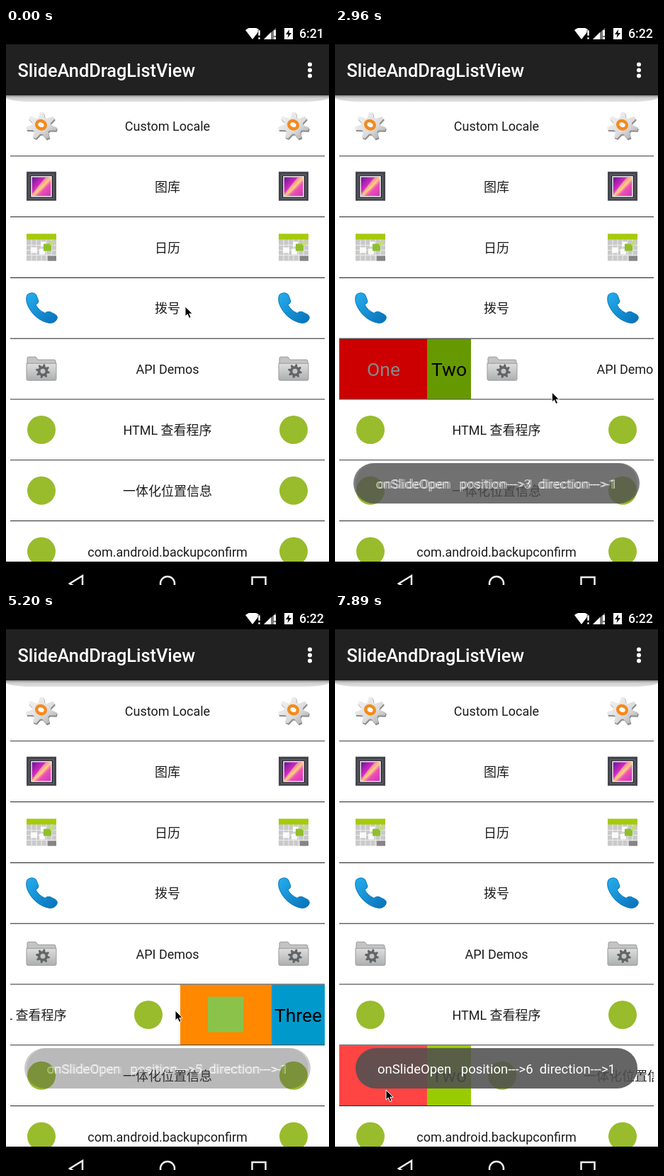
Recreate the animation shown at these times as an HTML page. Size 456 by 786 pixels, loop 8 s.

```html
<!DOCTYPE html>
<html lang="zh-CN">
<head>
<meta charset="utf-8">
<style>
html, body { margin: 0; width: 100%; height: 100%; overflow: hidden; background: #fff; }
svg { display: block; }
text { font-family: Roboto, "Noto Sans CJK SC", "Noto Sans CJK", sans-serif; white-space: pre; }
.label { font-size: 18px; fill: #1c1c1c; text-anchor: middle; }
.menu { font-size: 26.5px; text-anchor: middle; }
.toast text { font-size: 18.5px; fill: #fff; text-anchor: middle; }
</style>
</head>
<body>
<svg id="stage" width="456" height="786" viewBox="0 0 456 786">
  <defs>
    <linearGradient id="steel" x2="1" y2="1"><stop stop-color="#f6f6f6"/><stop offset=".6" stop-color="#dcdcdc"/><stop offset="1" stop-color="#a4a4a4"/></linearGradient>
    <linearGradient id="silver" x2="0" y2="1"><stop stop-color="#dedede"/><stop offset="1" stop-color="#adafb0"/></linearGradient>
    <linearGradient id="blue" x2="1" y2="1"><stop stop-color="#25aeee"/><stop offset="1" stop-color="#0870b8"/></linearGradient>
    <linearGradient id="sunset" x2="1" y2="1"><stop stop-color="#5b1590"/><stop offset=".4" stop-color="#d92bc4"/><stop offset=".52" stop-color="#fbc58c"/><stop offset=".65" stop-color="#ee4fb4"/><stop offset="1" stop-color="#c935c0"/></linearGradient>
    <linearGradient id="shade" x2="0" y2="1"><stop stop-color="#8c8c8c"/><stop offset=".4" stop-color="#cfcfcf"/><stop offset="1" stop-color="#e2e2e2"/></linearGradient>

    <g id="locale">
      <path data-gear="13 21 7" transform="translate(1 2) scale(1.05 .92)" fill="#8a8a8a"/>
      <path data-gear="13 21 7" transform="scale(1.05 .92)" fill="url(#steel)"/>
      <ellipse cx="-1" cy="-1" rx="6.5" ry="5.500" fill="#fff" stroke="#f58a1c" stroke-width="4.500" transform="rotate(25)"/>
    </g>
    <g id="gallery">
      <path d="M-21-21H21V20H-21Z" fill="#45454e"/>
      <path d="M-17-16.500H17V16.500H-17Z" fill="#23232a" stroke="#77777f"/>
      <path d="M-14-14H14V14H-14Z" fill="url(#sunset)" stroke="#eee" stroke-width="1.500"/>
      <path d="M-13 13Q-6 0 6-13H13Q2 6-13 13Z" fill="#ffd27a" opacity=".6"/>
    </g>
    <g id="calendar">
      <path d="M-21-19H21V19H-21Z" fill="#c9c9c9"/>
      <path d="M-21-19H21V-11H-21Z" fill="#a6cb08"/>
      <path d="M-21-3H21M-21 4H21M-21 11H21M-14-11V19M-7-11V19M0-11V19M7-11V19M14-11V19" stroke="#eee"/>
      <path d="M9 12H21V19H9Z" fill="#858585"/>
      <path d="M-15 0h9v8h-9ZM-3 2h8v8h-8ZM-1-8h7v7h-7Z" fill="#fafafa"/>
      <path d="M3-5h11v10h-11Z" fill="#8fc02a"/><path d="M12-9h6v6h-6Z" fill="#c4de72"/>
    </g>
    <path id="phone" fill="url(#blue)" stroke="#0a78bd" d="M-20-19C-15-23-9-22-7-18L-4-10Q-4-7-8-5Q-4 3 5 7Q8 4 12 5L20 9Q24 12 21 17Q16 23 7 20C-7 16-18 3-21-9Q-22-16-20-19Z"/>
    <g id="folder">
      <path d="M-20 15V-15Q-20-17-18-17H-8L-5-13H18Q20-13 20-11V15Z" fill="#c4c4c4" stroke="#969696"/>
      <path d="M-21-8H21V14Q21 16 19 16H-19Q-21 16-21 14Z" fill="url(#silver)" stroke="#999"/>
      <path data-gear="7 10 8" transform="translate(2 3)" fill="#626466"/>
      <circle cx="2" cy="3" r="3.500" fill="#c4c4c4"/>
    </g>
    <circle id="app" r="20" fill="#98bc2c"/>
  </defs>

  <path d="M0 0H456V786H0Z" fill="#fff"/>
  <g id="list"></g>

  <path d="M0 95H456V99Q450 103 425 104H31Q6 103 0 99Z" fill="url(#shade)"/>
  <path d="M0 0H456V23H0Z"/>
  <path d="M0 23H456V95H0Z" fill="#212121"/>
  <text x="16.500" y="69" font-size="25.300" font-weight="500" fill="#fff">SlideAndDragListView</text>
  <g fill="#fff">
    <circle cx="429" cy="51.500" r="3"/><circle cx="429" cy="59.500" r="3"/><circle cx="429" cy="67.500" r="3"/>
    <path d="M338 3Q348-5 358 3L348 16Z"/>
    <path d="M356 3h3v8h-3ZM356 13h3v3h-3Z" stroke="#000" stroke-width=".6"/>
    <path d="M364 16L381 0V16Z" fill="#777"/><path d="M364 16L374 6V16Z"/>
    <path d="M378 3h3v8h-3ZM378 13h3v3h-3Z"/>
    <path d="M393 0H405V16H393Z"/><path d="M400 2L395 9H398.500L397.500 14L403 7H399.500Z" fill="#000"/>
    <text id="clock" x="414" y="14" font-size="17.700" font-weight="500"></text>
  </g>

  <path d="M0 753H456V786H0Z"/>
  <g fill="none" stroke="#eee" stroke-width="2.500">
    <path d="M108 790V773L90 784L100 790"/>
    <circle cx="228" cy="784" r="10"/>
    <path d="M347.500 790V775H366.500V790"/>
  </g>

  <g id="toasts"></g>
  <circle id="ring" r="14.500" fill="#fff" fill-opacity=".5" stroke="#9c9cd4" stroke-opacity=".6" stroke-width="1.800"/>
  <path id="cursor" d="M0 0V14L3.200 11L5.600 16.500L8.200 15.300L5.800 10.200H10.200Z" stroke="#fff"/>
</svg>
<script>
const $ = id => document.getElementById(id);
const LOOP = 8000, START = 432, STEP = 148.6; // the screen is sampled once per step

// Each drag moves a row between two offsets, then lets it settle at rest.
const drags = [
  { row: 3, begin: 0, end: 3, from: 0, to: -205, rest: -205, grab: 253, y: 393, leave: -400, opened: 4 },
  { row: 4, begin: 12, end: 16.9, from: 0, to: 186, rest: 186, grab: 117, y: 514, leave: 470, opened: 17 },
  { row: 5, begin: 27, end: 31, from: 0, to: -205, rest: -205, grab: 257, y: 558, leave: -40, opened: 32 },
  { row: 5, begin: 33, end: 36, from: -205, to: -37, rest: 0, grab: 239, y: 561, leave: 52 },
  { row: 6, begin: 41, end: 45, from: 0, to: 267, rest: 186, grab: 52, y: 673, leave: 72, opened: 48 }
];
const toasts = drags.filter(drag => drag.opened);
const slidingRows = [...new Set(drags.map(drag => drag.row))];
const rows = [
  ['locale', 'Custom Locale'], ['gallery', '图库'], ['calendar', '日历'], ['phone', '拨号'],
  ['folder', 'API Demos'], ['app', 'HTML 查看程序'], ['app', '一体化位置信息'], ['app', 'com.android.backupconfirm']
];

const clamp = v => Math.min(1, Math.max(0, v));
const mix = (a, b, p) => a + (b - a) * clamp(p);
const dragged = (d, step) => mix(d.from, d.to, (step - d.begin) / (d.end - d.begin));

function rowOffset(row, step) {
  const index = drags.findLastIndex(d => d.row === row && d.begin <= step);
  if (index < 0) return 0;
  const drag = drags[index], next = drags[index + 1];
  // Touching another row closes this one.
  if (next && next.begin <= step) return drag.rest * (1 - clamp((step - next.begin) / 3)) ** 3;
  return step <= drag.end ? dragged(drag, step) : mix(drag.to, drag.rest, (step - drag.end) / 3);
}

// The mouse runs one step ahead of the touch point it causes.
function cursorAt(step) {
  const d = drags.findLast(d => d.begin <= step + 1) || drags[0];
  const x = d.grab + dragged(d, step + 1) - d.from;
  return [mix(x, d.leave, (step - d.end) / 5), d.y];
}

const toastOpacity = (opened, step) => clamp(Math.min(step - opened + 1, opened + 15.5 - step) / 3);

function gearPath(inner, outer, teeth) {
  const points = [];
  for (let i = 0; i < teeth * 4; i++) {
    const r = i % 4 < 2 ? outer : inner;
    const angle = (i + .6) / (teeth * 4) * 2 * Math.PI;
    points.push((r * Math.cos(angle)).toFixed(1) + ' ' + (r * Math.sin(angle)).toFixed(1));
  }
  return 'M' + points.join('L') + 'Z';
}

const lineY = i => 180.3 + 85.8 * i;
const block = (x, width, fill) => `<rect x="${x}" width="${width}" height="86" fill="${fill}"/>`;
const menuText = (x, text, fill) => `<text class="menu" x="${x}" y="52" fill="${fill}">${text}</text>`;

function menus(i) {
  const [red, green] = i === 6 ? ['#ff4444', '#99cc00'] : ['#cc0000', '#669900'];
  return `<g id="left${i}">${block(0, 124, red)}${block(124, 62, green)}
      ${menuText(62.5, 'One', '#888')}${menuText(155, 'Two', '#000')}</g>
    <g id="right${i}">${block(240, 129, '#ff8800')}${block(369, 75, '#0099cc')}
      <rect x="279" y="17" width="50" height="50" fill="#8bc34a"/>${menuText(406.5, 'Three', '#000')}</g>`;
}

document.querySelectorAll('[data-gear]').forEach(el =>
  el.setAttribute('d', gearPath(...el.dataset.gear.split(' ').map(Number))));

$('list').innerHTML = rows.map(([icon, label], i) => `
  <svg x="6" y="${lineY(i - 1) + 1}" width="444" height="84.800">
    ${slidingRows.includes(i) ? menus(i) : ''}
    <g id="item${i}">${block(0, 444, '#fff')}
      <use href="#${icon}" x="44" y="42.500"/><use href="#${icon}" x="400" y="42.500"/>
      <text class="label" x="222" y="49.500">${label}</text></g>
  </svg>
  <rect x="6" y="${lineY(i)}" width="444" height="1" fill="#111"/>`).join('');

$('toasts').innerHTML = toasts.map(({ row, to }) => {
  const x = to < 0 ? 26 : 29;
  return `<g class="toast" id="toast${row}">
    <rect x="${x}" y="614" width="${456 - 2 * x}" height="57" rx="28.500" fill="#505050" fill-opacity=".88"/>
    <text x="228" y="650">onSlideOpen   position---&gt;${row}  direction---&gt;${Math.sign(to)}</text></g>`;
}).join('');

const move = (el, x, y) => el.setAttribute('transform', `translate(${x} ${y})`);
const show = (el, on) => el.setAttribute('visibility', on ? 'visible' : 'hidden');

function draw(time) {
  const step = Math.max(-1, Math.floor((time % LOOP - START) / STEP));
  for (const row of slidingRows) {
    const dx = rowOffset(row, step);
    move($('item' + row), dx, 0);
    show($('left' + row), dx > 0);
    show($('right' + row), dx < 0);
  }
  for (const { row, opened } of toasts) $('toast' + row).setAttribute('opacity', toastOpacity(opened, step));

  move($('cursor'), ...cursorAt(step));
  const touch = drags.find(d => d.begin <= step && step <= d.end);
  show($('ring'), touch);
  if (touch) move($('ring'), touch.grab + dragged(touch, step) - touch.from, touch.y + 4);
  $('clock').textContent = step < 9 ? '6:21' : '6:22';
}

const begin = performance.now();
function tick() {
  draw(performance.now() - begin);
  requestAnimationFrame(tick);
}
tick();
</script>
</body>
</html>
```
